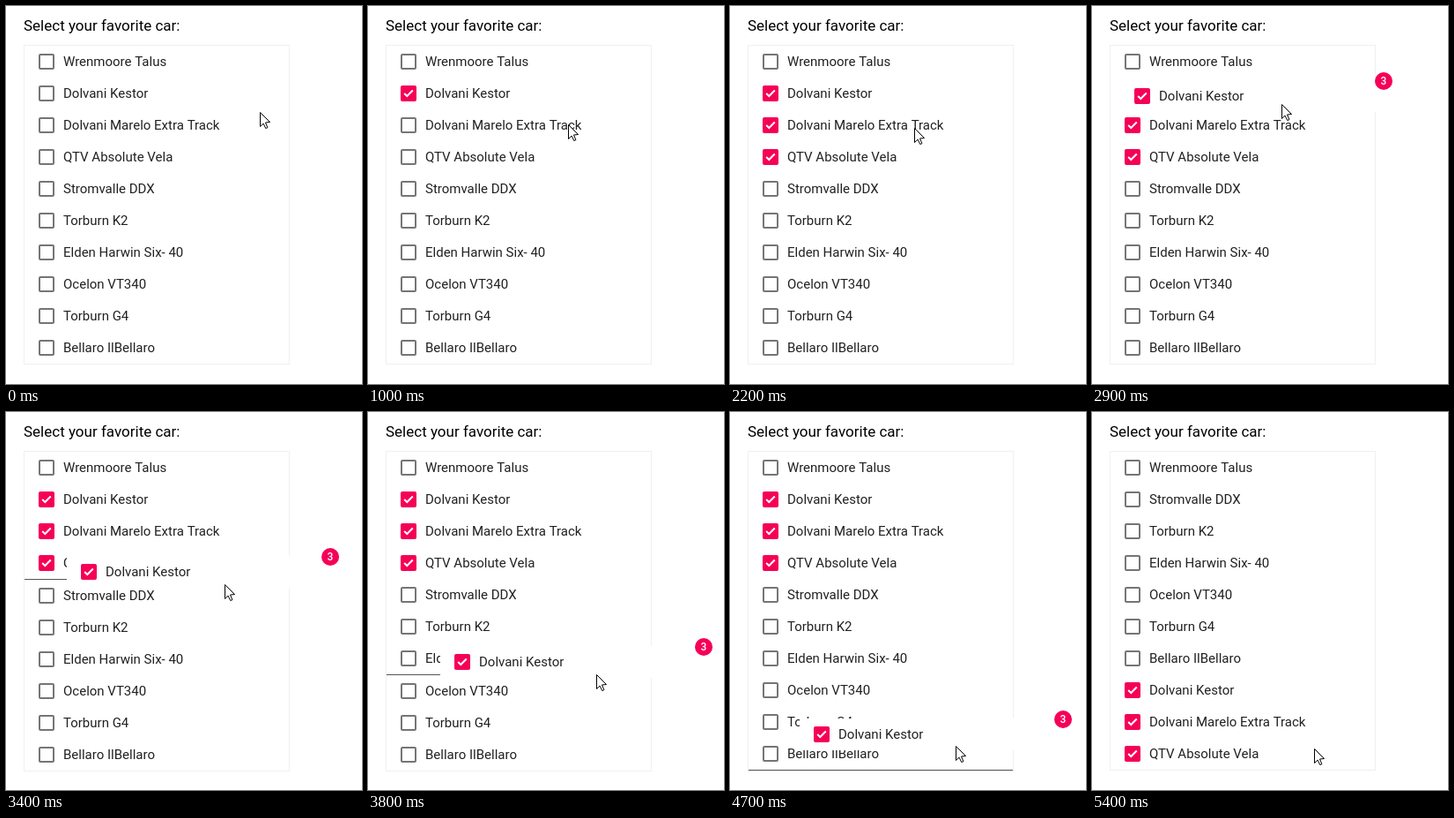
Animation of 404x428 px, one loop 5.9 s. Source, as an HTML page with a canvas:

```html
<!DOCTYPE html>
<html lang="en">
<head>
<meta charset="utf-8">
<title>Sortable checklist</title>
<style>
  html, body { margin: 0; width: 100%; height: 100%; overflow: hidden; background: #fff; }
  canvas { display: block; }
</style>
</head>
<body>
<canvas id="stage" width="404" height="428"></canvas>
<script>
const ctx = document.getElementById('stage').getContext('2d', { alpha: false });
const LOOP = 5900, STEP = 100;
const ROW = 36, TOP = 45, LEFT = 21, WIDTH = 300;
const ACCENT = '#f50057', INK = '#212121';
const DRAG_START = 2800, DROP = 5000;

const cars = [
  'Wrenmoore Talus', 'Dolvani Kestor', 'Dolvani Marelo Extra Track',
  'QTV Absolute Vela', 'Stromvalle DDX', 'Torburn K2',
  'Elden Harwin Six- 40', 'Ocelon VT340', 'Torburn G4', 'Bellaro IlBellaro'
];
const picked = cars.slice(1, 4);
const sorted = cars.filter(car => !picked.includes(car)).concat(picked);

const easeOut = k => 1 - (1 - k) ** 2.2;
const easeIn = k => k ** 2.2;

// Each leg runs from where the previous one ended; bend bows it sideways.
const pointerPath = {
  from: [288, 120],
  legs: [
    { start: 0, end: 400, to: [234, 104] },
    { start: 700, end: 1200, to: [226, 139] },
    { start: 1400, end: 1900, to: [213, 166] },
    { start: 2100, end: 2600, to: [203, 95] },
    { start: 2700, end: 2900, to: [215, 111] },
    { start: 2900, end: 3400, to: [248, 195], ease: easeIn, bend: 9 },
    { start: 3400, end: 4700, to: [256, 378], bend: 8 },
    { start: 5300, end: 5400, to: [252, 381] }
  ]
};
// Left edge and vertical centre of the dragged checkbox
const dragPath = {
  from: [37, 90],
  legs: [
    { start: 2700, end: 2900, to: [48, 102] },
    { start: 2900, end: 3400, to: [85, 181], ease: easeIn, bend: 9 },
    { start: 3400, end: 4700, to: [95, 365], bend: 9 }
  ]
};

function positionAt(path, t) {
  let [x, y] = path.from;
  for (const { start, end, to, ease = easeOut, bend = 0 } of path.legs) {
    if (t <= start) break;
    const k = Math.min(1, (t - start) / (end - start));
    x += (to[0] - x) * ease(k) + bend * Math.sin(Math.PI * k);
    y += (to[1] - y) * ease(k);
  }
  return [Math.round(x), Math.round(y)];
}

function fillRect(color, x, y, w, h) {
  ctx.fillStyle = color;
  ctx.fillRect(x, y, w, h);
}

function drawText(text, x, y, font, color = INK) {
  ctx.font = font + ' Roboto, sans-serif';
  ctx.fillStyle = color;
  ctx.fillText(text, x, y);
}

function tracePath(points) {
  ctx.beginPath();
  points.forEach(([x, y]) => ctx.lineTo(x, y));
}

function drawCheckbox(x, y, checked) {
  ctx.beginPath();
  if (checked) {
    ctx.roundRect(x, y, 18, 18, 2);
    ctx.fillStyle = ACCENT;
    ctx.fill();
    tracePath([[x + 4.2, y + 9], [x + 7.3, y + 12], [x + 13.8, y + 5.5]]);
    ctx.strokeStyle = '#fff';
  } else {
    ctx.roundRect(x + 1, y + 1, 16, 16, 1);
    ctx.strokeStyle = '#757575';
  }
  ctx.lineWidth = 2;
  ctx.stroke();
}

function drawItem(car, x, centerY, checked) {
  drawCheckbox(x, centerY - 9, checked);
  drawText(car, x + 28, centerY + 5, '15px');
}

function isChecked(car, t) {
  const turn = picked.indexOf(car);
  return turn >= 0 && t >= 400 + 800 * turn - 100 * Math.max(0, turn - 1);
}

function drawList(t, dropRow) {
  const shift = dropRow >= 0 ? 1 : 0;
  ctx.strokeStyle = '#f0f0f0';
  ctx.lineWidth = 1;
  ctx.strokeRect(LEFT - 0.5, TOP - 0.5, WIDTH + 1, ROW * cars.length + 1 + shift);
  (t < DROP ? cars : sorted).forEach((car, row) => {
    const y = TOP + ROW * row + (row > dropRow ? shift : 0);
    drawItem(car, LEFT + 16, y + ROW / 2, isChecked(car, t));
  });
  if (shift) fillRect('#555', LEFT, TOP + ROW * (dropRow + 1), WIDTH, 1);
}

function drawDragged(x, y) {
  fillRect('#fff', x - 16, y - ROW / 2, WIDTH, ROW);
  drawItem(picked[0], x, y, true);
  ctx.beginPath();
  ctx.arc(x + 283, y - 17, 10, 0, Math.PI * 2);
  ctx.fillStyle = ACCENT;
  ctx.fill();
  ctx.textAlign = 'center';
  drawText(picked.length, x + 283, y - 13, '500 12px', '#fff');
  ctx.textAlign = 'left';
}

function drawPointer(x, y) {
  ctx.save();
  ctx.translate(x + 0.5, y + 0.5);
  tracePath([[0, 0], [0, 16], [3.6, 12.6], [6.2, 18], [8.4, 17.2], [6, 11.5], [11, 11]]);
  ctx.closePath();
  ctx.fillStyle = '#fff';
  ctx.fill();
  ctx.strokeStyle = '#000';
  ctx.lineWidth = 1;
  ctx.stroke();
  ctx.restore();
}

function render(now) {
  const t = Math.floor((now % LOOP) / STEP) * STEP;
  const dragging = t >= DRAG_START && t < DROP;
  const drag = positionAt(dragPath, t);
  const hovered = Math.floor((drag[1] + 6 - TOP) / ROW);

  fillRect('#fff', 0, 0, 404, 428);
  drawText('Select your favorite car:', 20, 28, '17px', '#000');
  drawList(t, dragging && hovered > 1 ? hovered : -1);
  if (dragging) drawDragged(...drag);
  drawPointer(...positionAt(pointerPath, t));
}

function tick() {
  render(performance.now());
  requestAnimationFrame(tick);
}
tick();
</script>
</body>
</html>
```
